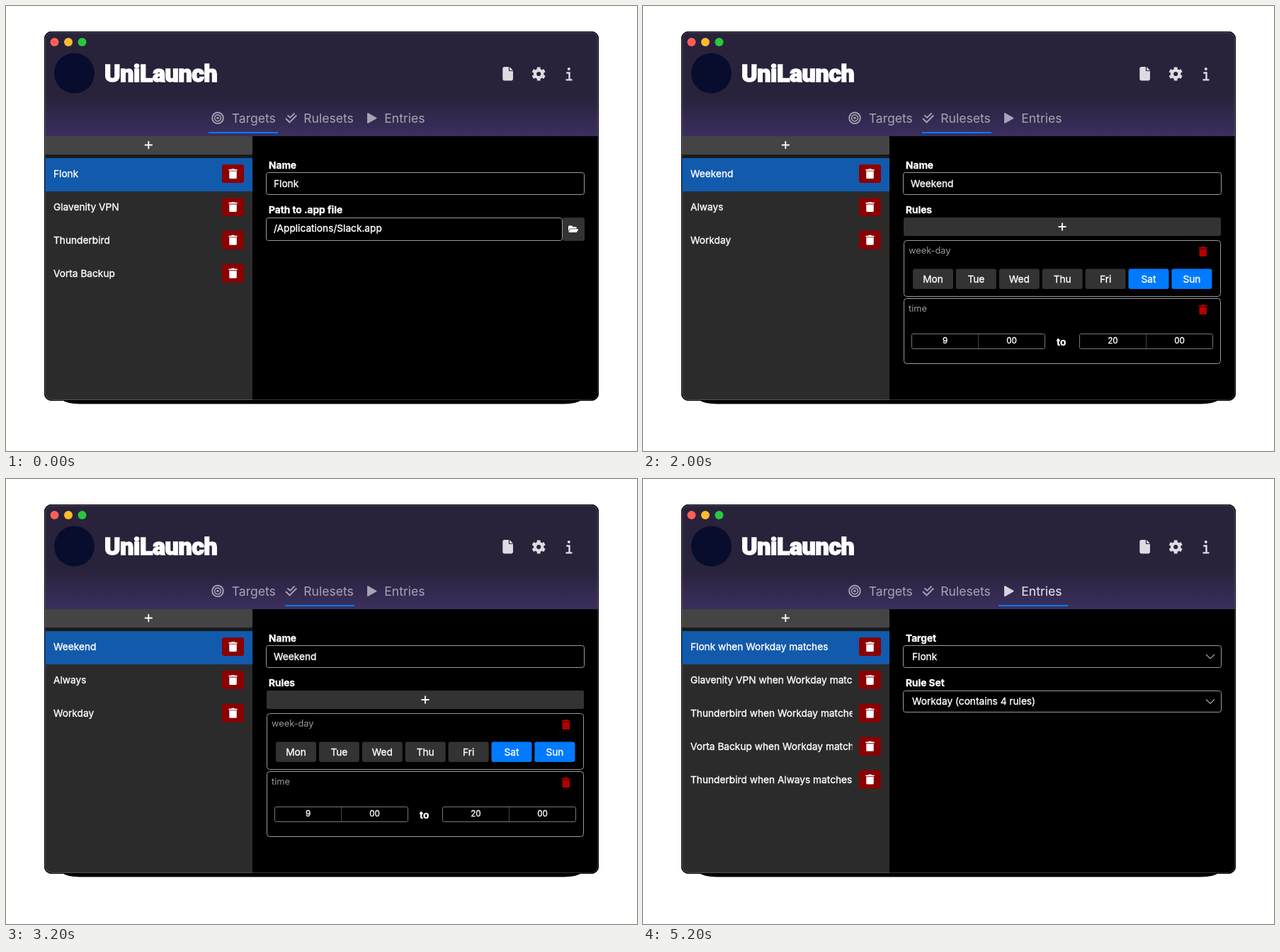
Animation, 891 px wide and 629 px high, one loop 6000 ms. Source, as an HTML page:

```html
<!DOCTYPE html>
<html lang="en">
<head>
<meta charset="utf-8">
<title>UniLaunch</title>
<style>
  html, body { margin: 0; width: 100%; height: 100%; overflow: hidden; background: #fff; }
  svg { display: block; }
  text { font: 13.7px Inter, sans-serif; fill: #fff; stroke: #fff; stroke-width: .35; }
  .label { font-weight: 700; }
  .tab { font-size: 17.6px; fill: #a8a4b3; stroke: none; }
  .tab.hover { fill: #d6d3de; }
  .title { font: 900 34px Roboto, sans-serif; letter-spacing: -.4px; stroke-width: 1.5; }
  .rule { font-size: 12.8px; fill: #999; stroke: none; }
  .time { font-size: 11.7px; }
  .mid { text-anchor: middle; }
  .field { fill: #000; stroke: #999; }
  .line { fill: none; stroke: #fff; stroke-width: 1.8; }
</style>
</head>
<body>
<svg id="stage" width="891" height="629" viewBox="0 0 891 629">
  <defs>
    <linearGradient id="header" x2="0" y2="1">
      <stop offset=".62" stop-color="#29223b"/>
      <stop offset="1" stop-color="#3b2f5e"/>
    </linearGradient>
    <clipPath id="window"><rect x="54" y="36" width="783" height="522" rx="10"/></clipPath>
    <clipPath id="list"><path d="M55 210H295.5V556H55z"/></clipPath>
    <path id="trash" transform="scale(.0273) translate(-224 -256)" d="M32 464a48 48 0 0 0 48 48h288a48 48 0 0 0 48-48V128H32zM432 32H312l-9-19A24 24 0 0 0 281 0H167a24 24 0 0 0-22 13L136 32H16A16 16 0 0 0 0 48v32a16 16 0 0 0 16 16h416a16 16 0 0 0 16-16V48a16 16 0 0 0-16-16z"/>
    <path id="plus" class="line" d="M-5.5 0H5.5M0-5.5V5.5"/>
    <path id="chevron" fill="none" stroke="#aaa" stroke-width="1.1" d="M-6-3L0 3L6-3"/>
    <path id="play" stroke-width="1.9" stroke-linejoin="round" d="M511 152V165L522.5 158.5z"/>
  </defs>
</svg>
<script>
const stage = document.getElementById('stage');

const text = (x, y, str, cls = '') => `<text x="${x}" y="${y}" class="${cls}">${str}</text>`;
const rect = (x, y, w, h, attrs, r = 0) =>
  `<rect x="${x}" y="${y}" width="${w}" height="${h}" rx="${r}" ${attrs}/>`;
const circle = (x, y, r, attrs) => `<circle cx="${x}" cy="${y}" r="${r}" ${attrs}/>`;
const icon = (id, x, y, fill = '#fff') => `<use href="#${id}" x="${x}" y="${y}" fill="${fill}"/>`;
const field = (y, w = 449, h = 31) => rect(367.5, y, w, h, 'class="field"', 3);
const entriesTab = (color, cls) =>
  `<use href="#play" fill="${color}" stroke="${color}"/>` + text(534.2, 164.5, 'Entries', cls);

const chrome = () => {
  const dots = ['#ff5f57', '#febc2e', '#28c840']
    .map((c, i) => circle(68.5 + i * 19.5, 51, 6, `fill="${c}"`)).join('');
  const teeth = [0, 60, 120]
    .map(a => `<path d="M0-9.6V-6M0 6V9.6" stroke-width="4.8" transform="rotate(${a})"/>`).join('');
  const toolIcons = `
    <g fill="#dedce3" stroke="#dedce3" stroke-width="0">
      <path transform="translate(701.3 86) scale(.0382)" d="M0 64C0 29 29 0 64 0H224V128c0 18 14 32 32 32H384V448c0 35-29 64-64 64H64c-35 0-64-29-64-64zM384 128H256V0z"/>
      <g transform="translate(752.2 96)">${circle(0, 0, 5.2, 'fill="none" stroke-width="4.2"')}${teeth}</g>
      ${circle(794.8, 89, 2)}
      <path fill="none" stroke-width="2.4" d="M791.3 94.5H795.5V104M790.5 104.4H799.5"/>
    </g>`;
  const tabIcons = `
    <g fill="none" stroke="#a8a4b3" stroke-width="1.9">
      ${circle(299, 158.3, 7.8)}${circle(299, 158.3, 4.4, 'stroke-width="1.6"')}
      ${circle(299, 158.3, 1.7, 'fill="#a8a4b3" stroke="none"')}
      <path d="M397.5 154.5L401.3 157.8L407.5 151.5M395 159L400.5 164.3L410.3 154.5"/>
    </g>`;
  return `
    <path d="M78 556Q86 562.5 104 562.5H788Q806 562.5 814 556z"/>
    <g clip-path="url(#window)">
      ${rect(54, 36, 783, 522, '')}
      ${rect(54, 36, 783, 148, 'fill="url(#header)"')}
      ${rect(55, 184, 293, 373, 'fill="#2b2b2b"')}
      ${rect(55, 209, 293, 6, 'fill="#1a1a1a"')}
      ${rect(55, 184, 293, 26, 'fill="#444"', 2)}
    </g>
    ${rect(55.5, 37.5, 780, 519, 'fill="none" stroke="#fff" stroke-opacity=".2"', 9)}
    ${rect(54.5, 36.5, 782, 521, 'fill="none" stroke="#000"', 10)}
    ${dots}${circle(96.5, 95, 28.5, 'fill="#080d2e"')}
    ${text(139, 107.3, 'UniLaunch', 'title')}${toolIcons}${tabIcons}
    ${text(318.7, 164.5, 'Targets', 'tab')}
    ${text(420.2, 164.5, 'Rulesets', 'tab')}
    ${entriesTab('#a8a4b3', 'tab')}
    ${icon('plus', 201.3, 196.5)}`;
};

const sidebar = items => rect(55, 215, 293, 47, 'fill="#125aac"') + items.map((name, i) => {
  const y = 237 + i * 46.9;
  return `<g clip-path="url(#list)">${text(67, y + 5, name)}</g>`
    + rect(305, y - 13, 31, 26, 'fill="#8b0000"', 3) + icon('trash', 320.5, y);
}).join('');

const page = (tab, items, body) => `<g class="page">
  ${rect(286 + tab * 108, 178, 98, 2, 'fill="#0a7aff"')}${sidebar(items)}${body}</g>`;

const targets = () => `
  ${text(371, 229.8, 'Name', 'label')}${field(235.5)}${text(378, 256, 'Flonk')}
  ${text(371, 293, 'Path to .app file', 'label')}${field(299.5, 418, 32)}
  ${text(378, 319.3, '/Applications/Slack.app')}
  ${rect(786, 299, 31, 33, 'fill="#333"', 3)}
  <path fill="#fff" transform="translate(794 309) scale(.0245)" d="M573 292l-73 124A64 64 0 0 1 445 448H45a24 24 0 0 1-21-36l73-124A64 64 0 0 1 152 256h400a24 24 0 0 1 21 36zM152 224h328v-48a48 48 0 0 0-48-48H272l-64-64H48a48 48 0 0 0-48 48v278l69-118A96 96 0 0 1 152 224z"/>`;

const timeBox = (x, hour, minute) =>
  rect(x, 463.5, 188, 21, 'class="field" style="stroke:#777"', 2)
  + `<path d="M${x + 94} 464V484" stroke="#444"/>`
  + text(x + 47, 477.3, hour, 'time mid') + text(x + 141, 477.3, minute, 'time mid');

const rulesets = () => {
  const days = ['Mon', 'Tue', 'Wed', 'Thu', 'Fri', 'Sat', 'Sun'].map((day, i) => {
    const x = 381 + i * 60.9;
    return rect(x, 371.5, 57, 28.5, `fill="${i > 4 ? '#007aff' : '#333'}"`, 3)
      + text(x + 28.5, 390.8, day, 'mid');
  }).join('');
  return `
    ${text(371, 229.8, 'Name', 'label')}${field(235.5)}${text(378, 256, 'Weekend')}
    ${text(371, 293, 'Rules', 'label')}
    ${rect(368, 299, 448, 26, 'fill="#333"', 2)}${icon('plus', 592, 312)}
    ${rect(368.5, 331.5, 447, 79, 'class="field"', 4)}
    ${text(375, 350, 'week-day', 'rule')}${icon('trash', 790.7, 347, '#b30000')}${days}
    ${rect(368.5, 413.5, 447, 92, 'class="field"', 4)}
    ${text(375, 432, 'time', 'rule')}${icon('trash', 790.7, 429, '#b30000')}
    ${timeBox(379.5, '9', '00')}${text(590.7, 479.5, 'to', 'label mid')}${timeBox(616.5, '20', '00')}`;
};

const entries = () => `
  ${entriesTab('#d6d3de', 'tab hover')}
  ${text(371, 229.8, 'Target', 'label')}${field(235.5)}
  ${text(380, 256, 'Flonk')}${icon('chevron', 801, 251)}
  ${text(371, 293, 'Rule Set', 'label')}${field(299.5, 449, 30)}
  ${text(380, 319.3, 'Workday (contains 4 rules)')}${icon('chevron', 801, 314.5)}`;

const apps = ['Flonk', 'Glavenity VPN', 'Thunderbird', 'Vorta Backup'];
const schedule = [...apps.map(app => `${app} when Workday matches`), 'Thunderbird when Always matches'];

stage.insertAdjacentHTML('beforeend', chrome()
  + page(0, apps, targets())
  + page(1, ['Weekend', 'Always', 'Workday'], rulesets())
  + page(2, schedule, entries()));

const pages = stage.querySelectorAll('.page');
const start = performance.now();
function draw() {
  const current = Math.floor((performance.now() - start) % 6000 / 2000);
  pages.forEach((p, i) => p.style.display = i === current ? '' : 'none');
  requestAnimationFrame(draw);
}
draw();
</script>
</body>
</html>
```
